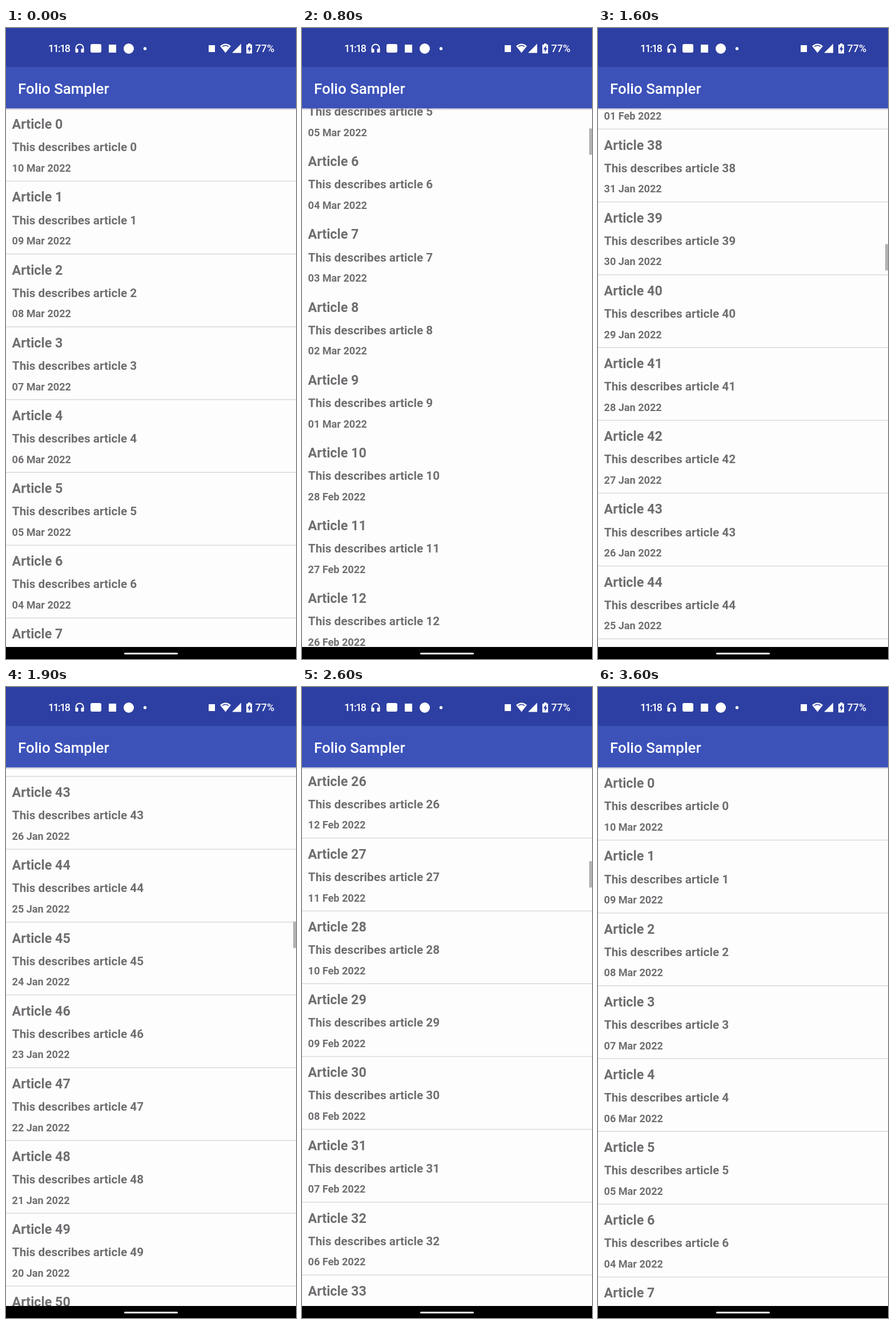
An HTML page for the animation above (3700 ms loop, 508 by 1102 pixels).

```html
<!DOCTYPE html>
<html lang="en">
<head>
<meta charset="utf-8">
<title>Scrolling article list</title>
<style>
  html, body { margin: 0; width: 100%; height: 100%; overflow: hidden; background: #000; }
  svg { display: block; width: 100%; height: 100%; font-family: Roboto, sans-serif; }
  .row { fill: #706e70; font-weight: 700; }
  .bar { fill: #fff; font-weight: 500; }
</style>
</head>
<body>
<svg viewBox="0 0 508 1102" preserveAspectRatio="none">
  <defs>
    <clipPath id="view"><rect y="140" width="508" height="941"/></clipPath>
    <linearGradient id="shade" x2="0" y2="1">
      <stop stop-color="#8c8ca0" stop-opacity=".45"/>
      <stop offset="1" stop-color="#8c8ca0" stop-opacity="0"/>
    </linearGradient>
  </defs>

  <rect y="140" width="508" height="941" fill="#fefdfe"/>
  <g clip-path="url(#view)">
    <g id="list"></g>
    <rect id="thumb" x="503" width="5" height="46" fill="#b4b2b4"/>
  </g>

  <rect width="508" height="69" fill="#2d3fa2"/>
  <rect y="68" width="508" height="72.5" fill="#3c52b9"/>
  <rect y="140.5" width="508" height="4" fill="url(#shade)"/>
  <text class="bar" x="21" y="115" font-size="25.9">Folio Sampler</text>

  <g class="bar">
    <text x="74" y="42" font-size="18" letter-spacing="-1.7">11:18</text>
    <text x="436.5" y="42" font-size="18">77%</text>
    <path d="M122.5 38V35a6.5 6.5 0 0 1 13 0V38" fill="none" stroke="#fff" stroke-width="2"/>
    <rect x="121.5" y="36" width="5" height="7" rx="1.5"/>
    <rect x="131.5" y="36" width="5" height="7" rx="1.5"/>
    <rect x="148" y="28" width="19" height="15" rx="3"/>
    <rect x="180" y="29" width="13" height="14"/>
    <circle cx="215" cy="36" r="9"/>
    <circle cx="243.500" cy="36" r="2.700"/>
    <rect x="355" y="30" width="11" height="12"/>
    <path d="M375 31.500Q384.500 23.500 394 31.500L384.500 43.500Z"/>
    <path d="M379 32.500Q384.500 28.500 390 32.500" fill="none" stroke="#2d3fa2" stroke-width="1.500"/>
    <path d="M412 27.500V43.500H396Z"/>
    <path d="M424 27h4.500v2h2.500v15.500h-10V29h3Z"/>
    <path d="M427.500 30.500L422.800 37.500H425.500V42.500L429.700 35.500H427.500Z" fill="#2d3fa2"/>
  </g>

  <rect y="1081" width="508" height="21"/>
  <rect x="207" y="1091" width="94" height="3" rx="1.500" fill="#fff"/>
</svg>
<script>
const LOOP = 3700, STEP = 100, PITCH = 127.17, ROWS = 10;
const MONTHS = ['Jan', 'Feb', 'Mar'];
const list = document.getElementById('list');
const thumb = document.getElementById('thumb');

function add(parent, tag, attrs) {
  const el = document.createElementNS('http://www.w3.org/2000/svg', tag);
  for (const key in attrs) el.setAttribute(key, attrs[key]);
  return parent.appendChild(el);
}

const rows = Array.from({ length: ROWS }, () => {
  const g = add(list, 'g', { class: 'row' });
  return {
    g,
    title: add(g, 'text', { x: 10.5, y: 176.3, 'font-size': 23.3 }),
    about: add(g, 'text', { x: 10.8, y: 215.4, 'font-size': 20.75 }),
    date: add(g, 'text', { x: 10.5, y: 251, 'font-size': 18.1 }),
    line: add(g, 'rect', { y: 266.6, width: 508, height: 1.7, fill: '#dedddf' })
  };
});

function dateOf(n) {
  const d = new Date(Date.UTC(2022, 2, 10 - n));
  return `${String(d.getUTCDate()).padStart(2, '0')} ${MONTHS[d.getUTCMonth()]} 2022`;
}

const speedUp = (t, start, end, power) => ((t - start) / (end - start)) ** power;
const slowDown = (t, start, end, power) => 1 - (1 - (t - start) / (end - start)) ** power;

// One fling down the list, then one back to the top.
function scrollAt(t) {
  if (t < 500) return 0;
  if (t < 1100) return 5 + 2331 * speedUp(t, 500, 1100, 1.75);
  if (t < 2200) return 2336 + 3287 * slowDown(t, 1100, 2200, 2.277);
  if (t < 2600) return 5623 - 2313 * speedUp(t, 2200, 2600, 1.7);
  if (t < 3300) return 3310 * (1 - slowDown(t, 2600, 3300, 2));
  return 0;
}

function draw(time) {
  const t = Math.floor((time % LOOP) / STEP) * STEP;
  const y = scrollAt(t);
  const first = Math.max(0, Math.floor((y - 130) / PITCH));
  const blurred = t >= 800 && t < 1300;

  rows.forEach((row, i) => {
    const n = first + i;
    row.g.setAttribute('transform', `translate(0 ${(n * PITCH - y).toFixed(2)})`);
    row.title.textContent = `Article ${n}`;
    row.about.textContent = `This describes article ${n}`;
    row.date.textContent = dateOf(n);
    row.line.setAttribute('opacity', blurred ? 0 : 1);
  });

  thumb.setAttribute('y', 141 + y * 0.0493);
  thumb.setAttribute('opacity', t < 500 || t >= 3600 ? 0 : t < 3500 ? 1 : 0.4);
}

const start = performance.now();
function tick() {
  draw(performance.now() - start);
  requestAnimationFrame(tick);
}
tick();
</script>
</body>
</html>
```
